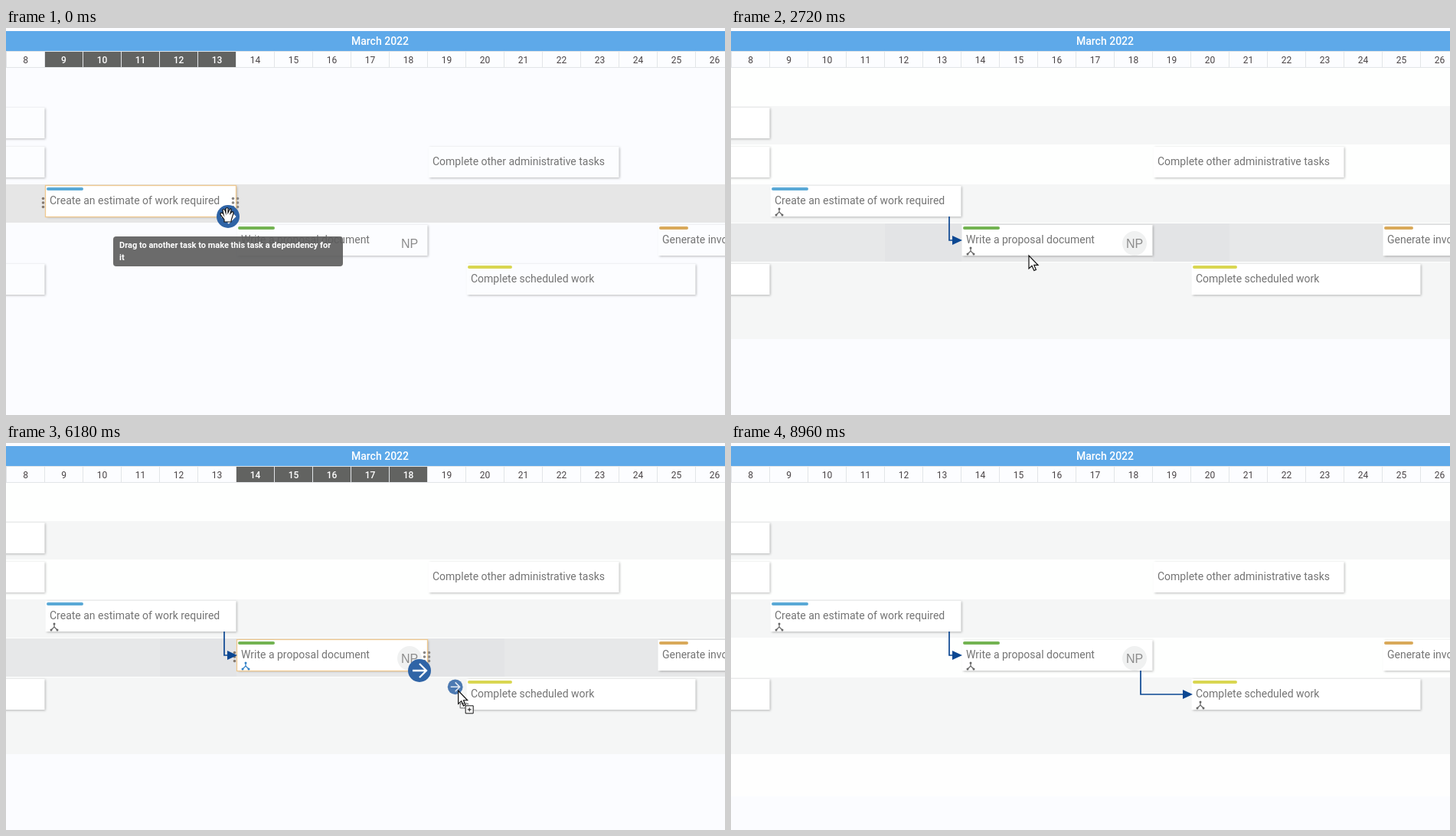
Recreate the animation shown at these times as an HTML page with a canvas. Size 939 by 505 pixels, loop 9330 ms.

```html
<!DOCTYPE html>
<html lang="en">
<head>
<meta charset="utf-8">
<title>Task dependencies</title>
<style>
html, body { margin: 0; width: 100%; height: 100%; overflow: hidden; background: #fbfcff }
canvas { display: block }
</style>
</head>
<body>
<canvas id="stage" width="939" height="505"></canvas>
<script>
const LOOP = 9330;
const DRAG1 = 740, DROP1 = 2190, LINK1 = 2600, HOVER2 = 3340, ACTIVE2 = 3700;
const DRAG2 = 5690, DROP2 = 6640, LINK2 = 7000, LEAVE = 8600;
const NAVY = '#0b4792', BLUE = '#2f64a6', FONT = 'Roboto, sans-serif';
const c = document.getElementById('stage').getContext('2d');

// Cards: x, y, width, label, bar width, bar colour
const first = [51, 206, 249, 'Create an estimate of work required', 48, '#5aa9d6'];
const second = [301, 257, 249, 'Write a proposal document', 48, '#73b352'];
const third = [601, 308, 299, 'Complete scheduled work', 58, '#d9d651'];
const cards = [
  [-20, 104, 70], [-20, 155, 70], [-20, 308, 70],
  [551, 155, 249, 'Complete other administrative tasks'],
  first, second, third,
  [851, 257, 120, 'Generate invoice', 38, '#d9a95a']
];

// Pointer tip: time, x, y
const track = [
  [0, 289, 244], [DRAG1, 289, 244], [1110, 297, 267], [1620, 390, 293],
  [2010, 389, 291], [DROP1, 389, 297], [HOVER2, 389, 297], [3640, 483, 295],
  [4180, 505, 296], [4300, 505, 296], [4900, 541, 297], [DRAG2, 541, 297],
  [6000, 560, 312], [6590, 660, 349], [LEAVE, 660, 349], [8760, 785, 455], [8930, 865, 530]
];

const arrowTip = new Path2D('M0 0V17L4 13.3L6.8 19.5L9.4 18.4L6.8 12.4H12Z');
const hand = new Path2D('M-4 9V6C-7 2-9 0-9-1C-9-4-6-3-5-1L-6-6C-6-8-4-8-3-6L-2-3V-8C-1-10 1-10 1-8V-3L3-7C4-9 6-8 5-6L4-2L6-4C8-5 8-3 8-2C7 2 5 5 5 9Z');
const depIcon = new Path2D('M0-4V0L-3.5 3.5M0 0L3.5 3.5');
const clamp = v => Math.max(0, Math.min(1, v));
const within = (t, a, b) => t >= a && t < b;

function rect(x, y, w, h, fill) {
  c.fillStyle = fill;
  c.fillRect(x, y, w, h);
}

function round(x, y, w, h, r, fill) {
  c.fillStyle = fill;
  c.beginPath();
  c.roundRect(x, y, w, h, r);
  c.fill();
}

function disc(x, y, r, fill) {
  c.fillStyle = fill;
  c.beginPath();
  c.arc(x, y, r, 0, 7);
  c.fill();
}

function text(s, x, y, font, fill, align = 'left') {
  c.font = font;
  c.fillStyle = fill;
  c.textAlign = align;
  c.fillText(s, x, y);
}

function at(x, y, scale, draw) {
  c.save();
  c.translate(x, y);
  c.scale(scale, scale);
  draw();
  c.restore();
}

function line(path, color, width) {
  c.strokeStyle = color;
  c.lineWidth = width;
  c.stroke(path);
}

function pointerAt(t) {
  let i = 1;
  while (i < track.length - 1 && track[i][0] < t) i++;
  const [t0, x0, y0] = track[i - 1], [t1, x1, y1] = track[i];
  const p = clamp((t - t0) / (t1 - t0));
  return [x0 + (x1 - x0) * p, y0 + (y1 - y0) * p];
}

function background(t) {
  const striped = within(t, LINK1, DROP2) || t >= LINK2;
  rect(0, 0, 939, 505, '#fbfcff');
  if (striped) {
    rect(0, 52, 939, 354, '#fefffe');
    for (const [y, h] of [[102, 50], [204, 50], [306, 100]]) rect(0, y, 939, h, '#f5f6f6');
  } else if (t >= DROP2) {
    rect(0, 52, 939, 316, '#fbfafb');
    rect(0, 368, 939, 38, '#f6f7f7');
  } else if (t >= DROP1) rect(0, 52, 939, 253, '#fcfefd');
  if (t >= LEAVE) rect(0, 406, 939, 55, '#fefefe');

  if (t < LINK1) rect(0, 204, 939, 50, '#e6e6e6');
  else if (t < LINK2) {
    rect(0, 255, 939, 50, '#e7e8e9');
    if (t < DROP2) for (const x of [201, 551]) rect(x, 255, 100, 50, '#e3e4e6');
  } else if (t < 8700) rect(0, 306, 939, 50, '#e7e8e9');
  return striped;
}

function header(t) {
  rect(0, 4, 939, 26, '#5ea9e9');
  text('March 2022', 488.5, 22, '500 14px ' + FONT, '#fff', 'center');
  rect(0, 30, 939, 22, '#e2e5e8');
  const from = t < LINK1 ? 9 : within(t, ACTIVE2, LINK2) ? 14 : 99;
  for (let day = 8; day <= 26; day++) {
    const x = (day - 8) * 50, dark = day >= from && day < from + 5;
    rect(x + 1, 31, 49, 20, dark ? '#626361' : '#fcfdff');
    text(day, x + 25.5, 46, (dark ? '500' : '400') + ' 12px ' + FONT, dark ? '#fff' : '#494345', 'center');
  }
}

function card([x, y, w, label, barWidth, color], fill, lifted) {
  c.save();
  c.shadowColor = lifted ? 'rgba(0,0,0,.3)' : 'rgba(0,0,0,.28)';
  c.shadowBlur = lifted ? 7 : 3;
  c.shadowOffsetX = c.shadowOffsetY = 1;
  rect(x + .5, y, w, 40, fill);
  c.restore();
  if (color) round(x + 2, y + 2, barWidth, 4, 2, color);
  if (label) text(label, x + 6, y + 24, '14px ' + FONT, '#747474');
}

function dependency([x, y], color) {
  at(x + 12, y + 34, 1, () => {
    line(depIcon, color, 1.2);
    for (const [a, b] of [[0, -4], [-4, 4], [4, 4]]) disc(a, b, 1.5, color);
  });
}

function handles([x, y, w]) {
  for (let i = 0; i < 3; i++) {
    const dy = y + 16.5 + i * 5.5;
    disc(x - 2.5, dy, 1.8, '#85796f');
    for (const dx of [-3, 3]) disc(x + w + dx - .5, dy, 1.8, '#8a8683');
  }
}

function outline([x, y, w]) {
  c.strokeStyle = '#efc88f';
  c.lineWidth = 1.3;
  c.strokeRect(x + .5, y - .5, w, 41);
}

function connector(x, y, endX, endY) {
  line(new Path2D(`M${x} ${y}V${endY}H${endX - 10}`), NAVY, 1.7);
  c.fillStyle = NAVY;
  c.fill(new Path2D(`M${endX - 13} ${endY - 6}L${endX} ${endY}L${endX - 13} ${endY + 6}Z`));
}

function linkButton(x, y, scale = 1) {
  at(x, y, scale, () => {
    disc(0, 0, 15, BLUE);
    line(new Path2D('M-9 0H9M0-9L9 0L0 9'), '#fff', 2.3);
  });
}

function tooltip(t, x, y, start, end) {
  if (!within(t, start, end + 100)) return;
  const p = 1 - (1 - clamp((t - start) / 200)) ** 3;
  c.globalAlpha = p * clamp((end + 100 - t) / 100);
  at(x, y, .92 + .08 * p, () => {
    round(-150, -19.5, 300, 39, 4, 'rgba(91,91,91,.9)');
    const font = '700 11px ' + FONT;
    text('Drag to another task to make this task a dependency for', -142, -4.5, font, '#fff');
    text('it', -142, 11.5, font, '#fff');
  });
  c.globalAlpha = 1;
}

function pointer(t) {
  const [x, y] = pointerAt(t);
  const dragging = within(t, DRAG1, DROP1) || within(t, DRAG2, DROP2);
  const grab = t < DRAG1 || within(t, HOVER2 + 60, DRAG2);
  if (dragging) {
    c.globalAlpha = .85;
    linkButton(x - 4, y - 5, .66);
    c.globalAlpha = 1;
  }
  at(x, y, 1, () => {
    const shape = grab ? hand : arrowTip;
    c.fillStyle = '#fff';
    c.fill(shape);
    line(shape, '#111', 1.2);
    if (!dragging) return;
    c.setLineDash([1, 1]);
    c.strokeRect(2.5, 16.5, 10, 6);
    c.setLineDash([]);
    rect(9, 19, 11, 11, '#fff');
    line(new Path2D('M9.5 19.5H19.5V29.5H9.5ZM12 24.5H17M14.5 22V27'), '#111', 1);
  });
}

function draw(t) {
  const striped = background(t);
  header(t);
  const active = t < LINK1 ? first : within(t, HOVER2 + 60, LINK2) ? second : null;
  const over = within(t, 1250, DROP1) ? second : within(t, 6250, DROP2) ? third : null;
  for (const item of cards) {
    const white = striped || item === active && t < DROP2;
    card(item, white ? '#fff' : t >= DROP2 ? '#fbfafb' : '#fcfdff', item === over);
  }

  if (striped) disc(527, 281, 16, '#f0f1f1');
  text('NP', 527, 287, '16px "Liberation Sans", sans-serif', '#8c8c8c', 'center');
  if (t >= DROP1) {
    dependency(first, t < LINK1 ? '#2f7fc6' : '#666');
    dependency(second, within(t, 4300, LINK2) ? '#2f7fc6' : '#666');
  }
  if (t >= DROP2) dependency(third, '#666');

  if (active) {
    handles(active);
    if (t < DROP1 || within(t, HOVER2, DROP2)) outline(active);
  }
  if (t >= LINK1) connector(285, 246, 302, 277);
  if (t >= LINK2) connector(535, 297, 603, 328);
  if (t < LINK1) linkButton(290, 246);
  if (within(t, ACTIVE2, LINK2)) linkButton(540, 297);

  tooltip(t, 290, 291.5, -200, DRAG1 + 60);
  tooltip(t, 290, 293.5, DROP1, LINK1);
  tooltip(t, 540, 340.5, 4950, DRAG2 + 60);
  tooltip(t, 540, 345.5, DROP2 - 30, LINK2);
  pointer(t);
}

const begin = performance.now();
function tick() {
  draw((performance.now() - begin) % LOOP);
  requestAnimationFrame(tick);
}
tick();
</script>
</body>
</html>
```
